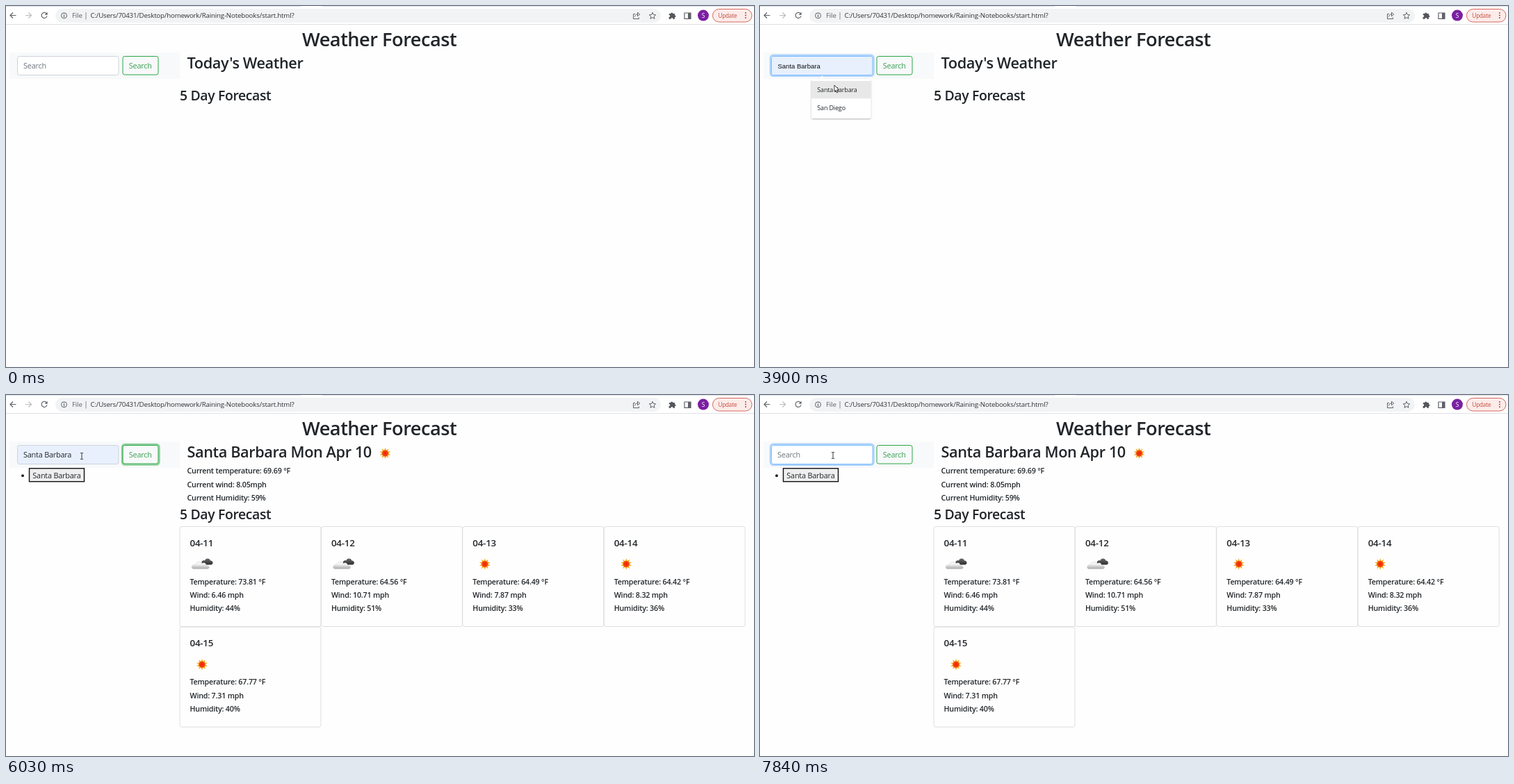
An HTML page that plays this animation: 1076x520 px, repeating every 8 s.

```html
<!DOCTYPE html>
<html lang="en">
<head>
<meta charset="utf-8">
<title>Weather Forecast</title>
<style>
html, body { margin: 0; width: 100%; height: 100%; overflow: hidden; background: #fefefe; }
svg { display: block; }
text { font: 10.85px "Open Sans", "Noto Sans", sans-serif; letter-spacing: -.018em; fill: #212529; white-space: pre; }
.h text, text.h { font-weight: 600; }
.h text { font-size: 10.7px; }
.line { fill: none; stroke: #5f6368; stroke-width: 1.2; }
.small { font-size: 9px; }
</style>
</head>
<body>
<svg width="1076" height="520" viewBox="0 0 1076 520">
  <defs>
    <linearGradient id="fog" x2="0" y2="1"><stop offset=".35" stop-color="#f4f4f4"/><stop offset="1" stop-color="#a9a9a9"/></linearGradient>
    <linearGradient id="smoke" x2="0" y2="1"><stop stop-color="#6b6b6b"/><stop offset="1" stop-color="#2e2e2e"/></linearGradient>
    <radialGradient id="heat"><stop offset=".3" stop-color="#f5260a"/><stop offset="1" stop-color="#f0560f"/></radialGradient>
    <filter id="soft" x="-20%" y="-20%" width="140%" height="150%"><feDropShadow dx="0" dy="1" stdDeviation="1.3" flood-opacity=".3"/></filter>
    <g id="sun"><path id="rays" fill="#f6a51e"/><circle r="4.5" fill="url(#heat)"/></g>
    <g id="cloud">
      <path d="M0 1C-2-4 1-6 4-5C5-9 11-9 12-5C16-5 17 0 13 1Z" fill="url(#smoke)"/>
      <path d="M-13 7C-17 5-14 0-10 1C-9-4-2-5 0-1C4-3 6 0 6 2C11 2 12 6 8 7Z" fill="url(#fog)" stroke="#ccc" stroke-width=".4"/>
    </g>
  </defs>

  <!-- browser bar -->
  <path d="M0 0H1076V26H0Z" fill="#fff"/>
  <path d="M0 .5H424M455 .5H1076M0 26.5H1076" stroke="#dfe1e5"/>
  <rect x="71" y="4" width="871" height="20" rx="10" fill="#f1f3f4"/>
  <path class="line" d="M14.5 13.5H6M10 9.5L6 13.5L10 17.5"/>
  <path class="line" style="stroke:#babcbe" d="M28 13.5H36.5M32.5 9.5L36.5 13.5L32.5 17.5"/>
  <path class="line" d="M58.3 11A4 4 0 1 0 59 14.3"/>
  <path d="M59.6 8.8V12.8H55.6Z" fill="#5f6368"/>
  <circle class="line" cx="83.5" cy="13.8" r="4" style="stroke-width:1"/>
  <path class="line" d="M83.5 13V16.2M83.5 11.2V12.3"/>
  <text x="95" y="17.3" style="font-size:9.7px;fill:#5f6368">File</text>
  <path d="M115 9V19.5" stroke="#8a8d91"/>
  <text x="121.5" y="17.3" style="font-size:9.7px;fill:#303236">C:/Users/70431/Desktop/homework/Raining-Notebooks/start.html?</text>
  <path class="line" style="stroke-width:1" d="M905 11.5H902.5V18.5H910.5V16.5M904.5 15.5C905 12.5 907 11.8 909 11.8M908.5 9.3L911.8 12L908.5 14.7Z"/>
  <path class="line" style="stroke-width:1" d="M930 9.3L931.4 12.5L934.7 12.8L932.2 15L933 18.3L930 16.5L927 18.3L927.8 15L925.3 12.8L928.6 12.5Z"/>
  <path d="M954 11H956.3A1.5 1.5 0 1 1 959.3 11H962V13.3A1.5 1.5 0 1 1 962 16.3V18.7H959.6A1.6 1.6 0 0 0 956.4 18.7H953.6V16A1.6 1.6 0 0 0 953.6 12.8Z" fill="#54575b"/>
  <path class="line" d="M976 10H985V18.3H976Z"/><path d="M981 10H985V18H981Z" fill="#5f6368"/>
  <circle cx="1003" cy="13.6" r="8" fill="#7b1fa2"/>
  <text x="1003" y="16.6" text-anchor="middle" style="font-size:8.5px;fill:#fff">S</text>
  <rect x="1016.5" y="4.5" width="56.5" height="18.5" rx="9.2" fill="#fbecea" stroke="#d8655a"/>
  <text x="1024.5" y="16.5" style="font-size:8.1px;fill:#c5483c">Update</text>
  <path d="M1064 10V18" stroke="#c5372b" stroke-width="1.9" stroke-linecap="round" stroke-dasharray="0 3.5"/>

  <!-- page -->
  <text class="h" x="426" y="57.8" style="font-size:27.2px">Weather Forecast</text>
  <rect x="5" y="67" width="245" height="38" fill="#f8f9fa"/>
  <rect id="inputRing" x="15" y="70.8" width="148.5" height="30" rx="4" fill="none" stroke="#007bff" stroke-opacity=".3" stroke-width="2.4"/>
  <rect id="input" x="16.5" y="72.5" width="145.5" height="27" rx="2.8" stroke="#ced4da"/>
  <text id="hint" x="25" y="90.3" style="fill:#6c757d">Search</text>
  <text id="preview" x="25.5" y="90" style="font:9.5px 'Liberation Sans',Arial,sans-serif;letter-spacing:0;fill:#111">Santa Barbara</text>
  <text id="typed" x="25" y="90.3"></text>
  <path id="caret" d="M0 78.5V93" stroke="#333" stroke-width=".9"/>
  <rect id="buttonRing" x="167" y="71" width="53.5" height="29.5" rx="4" fill="none" stroke="#28a745" stroke-opacity=".5" stroke-width="2.4"/>
  <rect id="button" x="168" y="72.5" width="51" height="26.5" rx="2.8" stroke="#28a745" fill="#28a745"/>
  <text id="label" x="176.8" y="90.3">Search</text>

  <g id="history">
    <circle cx="24" cy="116.2" r="2" fill="#212529"/>
    <rect x="33.5" y="105.7" width="79" height="19" fill="#efefef" stroke="#111" stroke-width="1.4"/>
    <text x="38.3" y="120">Santa Barbara</text>
  </g>

  <text id="today" class="h" x="260.5" y="89.5" style="font-size:21.7px"></text>
  <use id="todayIcon" href="#sun" x="545.5" y="84"/>
  <g id="current" class="h">
    <text x="260.5" y="110.6">Current temperature: 69.69 °F</text>
    <text x="260.5" y="129.9">Current wind: 8.05mph</text>
    <text x="260.5" y="149.2">Current Humidity: 59%</text>
  </g>
  <text id="five" class="h" x="250" style="font-size:19.4px">5 Day Forecast</text>
  <g id="cards" class="h"></g>

  <g id="menu">
    <path d="M84 105.5L89.3 100.3L94.6 105.5Z" fill="#fff" stroke="#e2e2e2" stroke-width=".5"/>
    <rect id="menuBox" x="74" y="105" width="85.5" rx="2" fill="#fff" filter="url(#soft)"/>
    <path id="hover" d="M74 108H159.5V133.3H74Z" fill="#e8e8e8"/>
    <text class="small" x="82.3" y="124.3">Santa Barbara</text>
    <text class="small" id="second" x="82.3" y="149.8">San Diego</text>
  </g>

  <g id="pointer">
    <path id="arrow" d="M0 0V9.3L2.1 7.4L3.6 10.8L5.2 10.1L3.7 6.8H6.7Z" fill="#fff" stroke="#111" stroke-width=".8"/>
    <path id="beam" d="M-2-4.5H-.6L0-4L.6-4.5H2M0-4V4M-2 4.5H-.6L0 4L.6 4.5H2" fill="none" stroke="#222" stroke-width=".9"/>
    <path id="hand" d="M-.9 7V.8A.9.9 0 0 1 .9.8V4.2L5 5.2C6 5.5 6 6.3 5.8 7.5L5 11.6H.2L-2.8 7.6C-3 6.6-1.8 6.2-.9 7Z" fill="#fff" stroke="#111" stroke-width=".8"/>
  </g>
</svg>
<script>
const LOOP = 8000, CITY = 'Santa Barbara';
// Moments of the main actions, in ms
const FOCUS = 2330, PICK = 4160, SUBMIT = 4700, LOADED = 5230, REFOCUS = 6230, ERASE = 6820, REPEAT = 7280;
const $ = id => document.getElementById(id);
const set = (id, name, value) => $(id).setAttribute(name, value);
const show = (id, on) => { $(id).style.display = on ? '' : 'none'; };
const clamp = v => Math.max(0, Math.min(1, v));
const within = (t, a, b) => t >= a && t < b;
const pulse = (t, a, b) => clamp((t - a) / 150) * (1 - clamp((t - b) / 150));
const mix = (a, b, k) => `rgb(${a.map((v, i) => v + (b[i] - v) * k)})`;

$('rays').setAttribute('d', 'M' + Array.from({length: 20}, (_, i) => {
  const a = i * Math.PI / 10, r = i % 2 ? 4.6 : 8.2;
  return [(r * Math.sin(a)).toFixed(2), (-r * Math.cos(a)).toFixed(2)];
}).join('L') + 'Z');

const days = [
  ['04-11', 'cloud', 73.81, '6.46', 44],
  ['04-12', 'cloud', 64.56, '10.71', 51],
  ['04-13', 'sun', 64.49, '7.87', 33],
  ['04-14', 'sun', 64.42, '8.32', 36],
  ['04-15', 'sun', 67.77, '7.31', 40]
];
$('cards').innerHTML = days.map(([date, icon, temp, wind, wet], i) => `
  <g transform="translate(${250 + i % 4 * 203.4} ${i < 4 ? 189.5 : 334.2})">
    <rect width="203" height="144" rx="2.8" fill="none" stroke="#dfdfdf"/>
    <text x="14.5" y="28.3" style="font-size:13.4px">${date}</text>
    <use class="icon" href="#${icon}" x="32" y="54"/>
    <text x="14.5" y="83.3">Temperature: ${temp} °F</text>
    <text x="14.5" y="102.5">Wind: ${wind} mph</text>
    <text x="14.5" y="121.7">Humidity: ${wet}%</text>
  </g>`).join('');
const icons = document.querySelectorAll('.icon');

const path = [
  [306, 687, 452], [440, 613, 436], [573, 613, 436], [640, 470, 389], [706, 230, 312], [773, 247, 309],
  [973, 247, 309], [1440, 100, 114], [1706, 100, 114], [2240, 90, 86], [3290, 90, 86], [3700, 105, 113],
  [3840, 107, 114], [4100, 107, 114], [4560, 204, 81], [5770, 204, 81], [6040, 109, 88], [6173, 105, 87], [LOOP, 105, 87]
];
function pointerAt(t) {
  // the screen was sampled 15 times a second
  const q = Math.floor((t - 26) * .015) / .015 + 40;
  const i = Math.max(1, path.findIndex(p => p[0] > q));
  const [t0, x0, y0] = path[i - 1], [t1, x1, y1] = path[i];
  const k = clamp((q - t0) / (t1 - t0));
  return [x0 + (x1 - x0) * k, y0 + (y1 - y0) * k];
}

function draw(t) {
  const [x, y] = pointerAt(t);
  const inRow = y > 72 && y < 100;
  const onInput = inRow && x > 16 && x < 162, onButton = inRow && x > 168 && x < 219;
  set('pointer', 'transform', `translate(${x} ${y})`);
  show('pointer', t >= 310);
  show('beam', onInput);
  show('hand', onButton);
  show('arrow', !onInput && !onButton);

  // suggestions
  const one = within(t, 6870, 7580);
  const open = within(t, FOCUS, PICK) || within(t, 6870, 7800);
  const hovered = within(t, FOCUS, PICK) && y >= 108;
  show('menu', open);
  show('second', !one);
  show('hover', hovered);
  set('menuBox', 'height', one ? 32 : 57);

  // input
  const left = t < PICK ? 0 : t < ERASE ? 13 : t < REPEAT ? 12 : Math.max(0, 11 - Math.floor((t - REPEAT) / 33));
  const focus = Math.max(pulse(t, FOCUS, SUBMIT), pulse(t, REFOCUS, LOOP));
  $('typed').textContent = CITY.slice(0, left);
  show('hint', !left && !hovered);
  show('preview', hovered);
  set('input', 'fill', hovered || within(t, PICK, ERASE) ? '#e8f0fe' : '#fff');
  set('input', 'stroke', mix([206, 212, 218], [128, 189, 255], focus));
  set('inputRing', 'opacity', focus);
  const caretOn = [[FOCUS, 2830], [3340, 3840], [PICK, 4660], [6260, 6760], [ERASE, 7800]].some(([a, b]) => within(t, a, b));
  show('caret', caretOn && !hovered);
  set('caret', 'transform', `translate(${25.5 + (left ? $('typed').getComputedTextLength() : 0)} 0)`);

  // button
  const enter = path.find(p => p[1] === 204)[0] - 100;
  const fill = pulse(t, enter, 5830);
  set('button', 'fill-opacity', fill);
  $('label').style.fill = mix([60, 160, 85], [255, 255, 255], fill);
  set('buttonRing', 'opacity', pulse(t, SUBMIT, REFOCUS));

  // results
  const loaded = t >= LOADED, full = t >= 5300;
  show('history', t >= SUBMIT);
  $('today').textContent = loaded ? CITY + ' Mon Apr 10' : "Today's Weather";
  show('current', loaded);
  set('current', 'transform', `translate(0 ${full ? 2.8 : 0})`);
  set('five', 'y', full ? 179.4 : loaded ? 176.7 : 135.8);
  show('todayIcon', full);
  show('cards', full);
  icons.forEach(el => { el.style.display = t >= 5370 ? '' : 'none'; });
}

const start = performance.now();
function frame(now) {
  draw(Math.max(0, now - start) % LOOP);
  requestAnimationFrame(frame);
}
draw(0);
requestAnimationFrame(frame);
</script>
</body>
</html>
```
